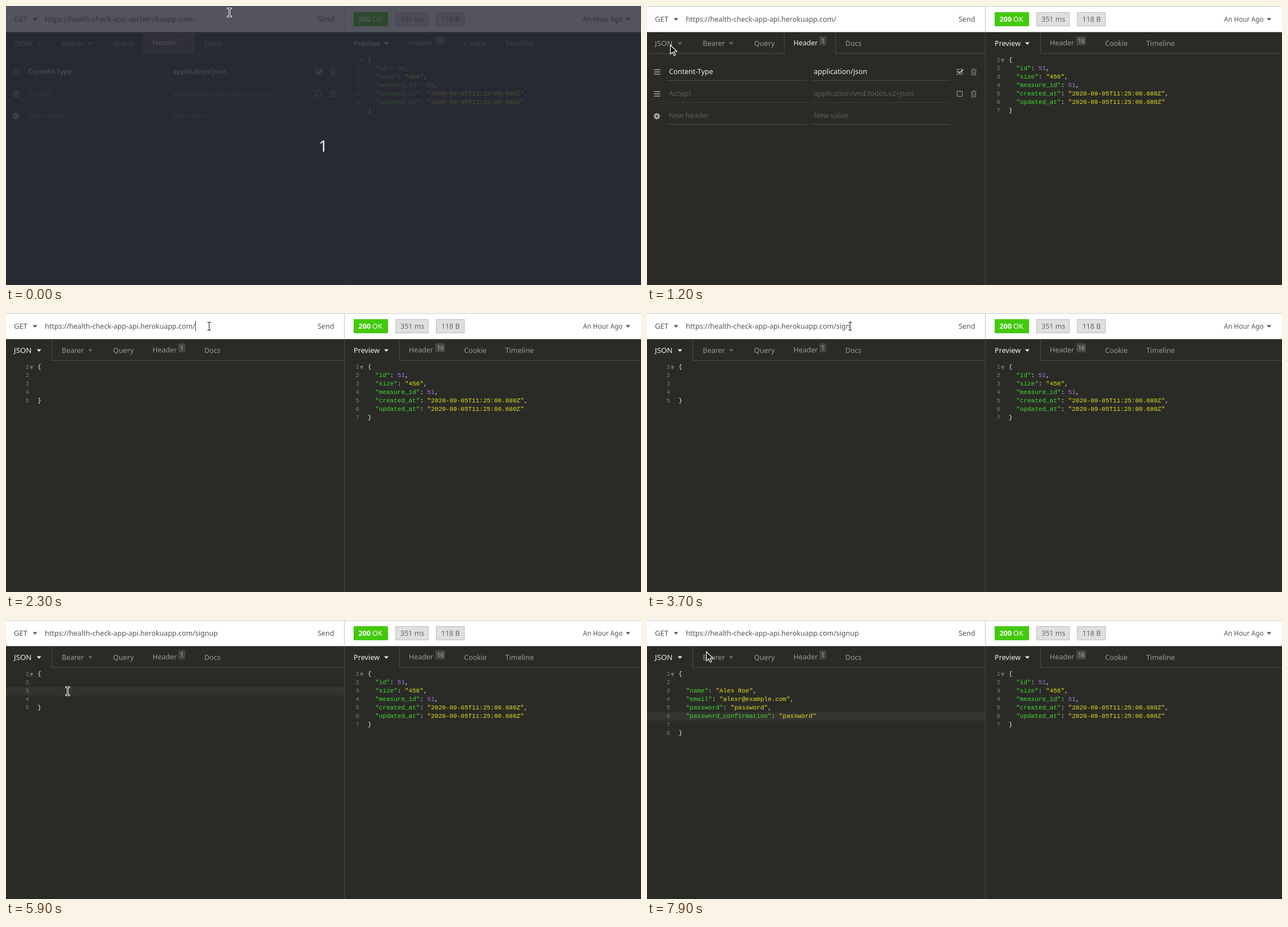
Animation, 1127 px wide and 496 px high, one loop 8000 ms. Source, as an HTML page with a canvas:

```html
<!DOCTYPE html>
<html lang="en">
<head>
<meta charset="utf-8">
<style>
  html, body { margin: 0; width: 100%; height: 100%; overflow: hidden; background: #2a2b26; }
  canvas { display: block; }
</style>
</head>
<body>
<canvas id="stage" width="1127" height="496"></canvas>
<script>
const ctx = document.getElementById('stage').getContext('2d');
const LOOP = 8000;
const SANS = '"Noto Sans", "Open Sans", sans-serif';
const MONO = '"Liberation Mono", monospace';
const BG = '#2a2b26', LINE = '#4a4b47', RAISED = '#464743', ACTIVE_ROW = '#33342f';
const BRIGHT = '#eeeeec', MUTED = '#989895', FAINT = '#5c5d59';
const KEY = '#46d936', STRING = '#e2de26', NUMBER = '#a774ea';
const URL_BASE = 'https://health-check-app-api.herokuapp.com/';

// Pointer stops: time, x, y, shape
const POINTER = [
  [0, 396, 11, 'beam'], [600, 370, 16, 'beam'], [700, 292, 32, 'beam'],
  [800, 196, 47, 'arrow'], [900, 128, 52, 'arrow'], [1100, 68, 62, 'arrow'],
  [1200, 41, 69, 'arrow'], [1600, 80, 57, 'beam'], [1800, 188, 36, 'beam'],
  [1900, 205, 37, 'beam'], [2100, 268, 31, 'beam'], [2200, 338, 24, 'beam'],
  [2300, 360, 23, 'beam'], [4800, 290, 70, 'beam'], [4900, 155, 130, 'beam'],
  [5100, 109, 126, 'beam'], [6700, 101, 134, 'beam'], [6800, 138, 158, 'beam'],
  [6900, 191, 163, 'beam'], [7100, 262, 152, 'beam'], [7200, 338, 134, 'beam'],
  [7400, 409, 88, 'beam'], [7600, 359, 88, 'beam'], [7800, 230, 74, 'arrow'],
  [7900, 105, 56, 'arrow']
];
const KEY_TIMES = [3200, 3300, 3500, 3700, 4200, 4300];

const EMPTY_BODY = ['{', '', '', '', '}'];
const FILLED_BODY = ['{', '', '  "name": "Alex Roe",', '  "email": "alexr@example.com",',
  '  "password": "password",', '  "password_confirmation": "password"', '', '}'];
const RESPONSE = ['{', '  "id": 51,', '  "size": "456",', '  "measure_id": 51,',
  '  "created_at": "2020-09-05T11:25:00.680Z",',
  '  "updated_at": "2020-09-05T11:25:00.680Z"', '}'];

const within = (t, from, to) => t >= from && t < to;

function rect(x, y, w, h, color) {
  ctx.fillStyle = color;
  ctx.fillRect(x, y, w, h);
}

function text(str, x, y, color, size = 12.5, weight = '') {
  ctx.font = `${weight} ${size}px ${SANS}`;
  ctx.fillStyle = color;
  ctx.fillText(str, x, y);
}

function poly(points, color) {
  ctx.beginPath();
  points.forEach(([x, y]) => ctx.lineTo(x, y));
  ctx.closePath();
  ctx.fillStyle = color;
  ctx.fill();
}

const dropMark = (x, y, color, w = 8, h = 4.5) =>
  poly([[x, y], [x + w, y], [x + w / 2, y + h]], color);

function outline(x, y, w, h, color) {
  ctx.strokeStyle = color;
  ctx.lineWidth = 1;
  ctx.strokeRect(x + .5, y + .5, w - 1, h - 1);
}

function chip(x, w, label, textX) {
  rect(x, 11, w, 25, '#dfdfdf');
  outline(x, 11, w, 25, '#bdbdbd');
  text(label, textX, 28, '#666');
}

function badge(x, w, label) {
  ctx.beginPath();
  ctx.roundRect(x, 54, w, 16, 2);
  ctx.fillStyle = RAISED;
  ctx.fill();
  text(label, x + 3, 66, '#b5b5b2', 10.5);
}

function topBar(t) {
  rect(0, 0, 1127, 46, '#fff');
  rect(0, 0, 1127, 1, '#c8c8c8');
  rect(0, 46, 1127, 1, '#81827f');
  rect(600, 0, 1, 46, '#c4c4c4');
  text('GET', 14, 28, '#555', 13);
  dropMark(47.5, 21.5, '#555');

  const typed = 'signup'.slice(0, KEY_TIMES.filter(k => t >= k).length);
  const url = URL_BASE + typed;
  text(url, 69, 28, '#555');
  if (within(t, 2300, 3000) || within(t, 3200, 4800))
    rect(Math.round(69 + ctx.measureText(url).width), 14, 1, 18, '#333');

  text('Send', 553, 28, '#555');
  rect(617, 11, 61, 25, '#43c90c');
  text('200', 625.5, 28, '#fff', 12.7, 'bold');
  text('OK', 650, 28, '#fff', 12.7);
  chip(691, 59, '351 ms', 700);
  chip(763, 51, '118 B', 772.5);
  text('An Hour Ago', 1024, 28, '#555', 11.7);
  dropMark(1100, 21.5, '#555');
}

function tabs(t) {
  const json = t >= 1300;
  const [x, right] = json ? [0, 82] : [243, 335];
  rect(0, 84, 600, 1, LINE);
  rect(699, 84, 428, 1, LINE);
  const pressed = t < 1200 || within(t, 1300, 2300);
  rect(x, 47, right - x, 38, pressed ? RAISED : BG);
  if (!json) rect(x, 47, 1, 38, LINE);
  rect(right - 1, 47, 1, 38, LINE);
  rect(698, 47, 1, 38, LINE);
  rect(600, 47, 1, 449, LINE);

  text('JSON', 14, 71, json ? BRIGHT : MUTED, 13.3);
  dropMark(54.5, 64.5, json ? BRIGHT : '#6b6c68');
  text('Bearer', 99, 71, MUTED);
  dropMark(145.5, 64.5, '#6b6c68');
  text('Query', 190, 71, MUTED, 12.7);
  text('Header', 260, 70, json ? MUTED : BRIGHT);
  badge(306, 12, '1');
  text('Docs', 352, 71, MUTED);

  text('Preview', 617, 71, BRIGHT, 12.7);
  dropMark(671, 64.5, BRIGHT);
  text('Header', 715, 70, MUTED);
  badge(762, 17, '16');
  text('Cookie', 813, 71, MUTED);
  text('Timeline', 886, 71, MUTED, 12.7);
}

function trash(y) {
  const c = '#8d8e8a';
  rect(575, y - 4, 10, 1, c);
  rect(578, y - 6, 4, 1, c);
  outline(576, y - 4, 8, 10, c);
  rect(578, y - 1, 1, 5, c);
  rect(581, y - 1, 1, 5, c);
}

function gear(x, y) {
  ctx.strokeStyle = ctx.fillStyle = '#a6a7a3';
  ctx.lineWidth = 3;
  ctx.beginPath();
  ctx.arc(x, y, 3.2, 0, 7);
  ctx.stroke();
  for (let i = 0; i < 8; i++) {
    ctx.save();
    ctx.translate(x, y);
    ctx.rotate(i * Math.PI / 4);
    ctx.fillRect(-1.2, -5.7, 2.4, 2);
    ctx.restore();
  }
}

function headerRow(y, name, value, color, dashed) {
  text(name, 39, y + 4, color);
  text(value, 296, y + 4, color, 12.6);
  ctx.strokeStyle = LINE;
  ctx.lineWidth = 1;
  ctx.setLineDash(dashed ? [3, 2] : []);
  ctx.beginPath();
  for (const [from, to] of [[36, 283], [293, 538]]) {
    ctx.moveTo(from, y + 15.5);
    ctx.lineTo(to, y + 15.5);
  }
  ctx.stroke();
  ctx.setLineDash([]);
}

function headerPane() {
  headerRow(117, 'Content-Type', 'application/json', BRIGHT);
  headerRow(156, 'Accept', 'application/vnd.todos.v2+json', FAINT, true);
  headerRow(195, 'New header', 'New value', FAINT);
  for (const y of [117, 156]) {
    for (const dy of [-4, 0, 4]) rect(12.5, y + dy - .5, 11, 1.5, '#a6a7a3');
    outline(550, y - 5, 10, 10, '#a0a19d');
    trash(y);
  }
  ctx.strokeStyle = '#d0d0cd';
  ctx.lineWidth = 1.7;
  ctx.beginPath();
  ctx.moveTo(552, 116);
  ctx.lineTo(555, 119);
  ctx.lineTo(561, 113);
  ctx.stroke();
  gear(17.5, 196);
}

function editor(lines, x) {
  ctx.font = `11px ${MONO}`;
  const charWidth = ctx.measureText('0').width;
  lines.forEach((line, i) => {
    const y = 99 + 15 * i;
    ctx.fillStyle = '#7b7c78';
    ctx.fillText(i + 1, x - 15 - charWidth, y);
    for (const m of line.matchAll(/"[^"]*"|\d+|[{}:,]/g)) {
      const isKey = line[m.index + m[0].length] === ':';
      ctx.fillStyle = m[0][0] === '"' ? (isKey ? KEY : STRING) : /\d/.test(m[0]) ? NUMBER : BRIGHT;
      ctx.fillText(m[0], x + m.index * charWidth, y);
    }
  });
  dropMark(x - 14, 94, '#6b6c68', 6.5, 7);
}

function bodyPane(t) {
  const filled = t >= 6200;
  if (t >= 5100) rect(0, filled ? 164 : 119, 600, 15, ACTIVE_ROW);
  editor(filled ? FILLED_BODY : EMPTY_BODY, 56);
  if (within(t, 5300, 5900)) rect(56, 119, 1, 15, BRIGHT);
  if (within(t, 6200, 6700) || within(t, 7400, 7900)) rect(300, 164, 1, 15, BRIGHT);
}

function pointer(t) {
  const [, x, y, shape] = POINTER.findLast(p => t >= p[0]);
  ctx.save();
  ctx.translate(x + .5, y + .5);
  if (shape === 'arrow') {
    const path = new Path2D('M0 0V16L4 12.5 6.5 18.5 9 17.5 6.5 11.5H11.5Z');
    ctx.fillStyle = '#111';
    ctx.fill(path);
    ctx.strokeStyle = '#fff';
    ctx.lineWidth = 1.2;
    ctx.stroke(path);
  } else {
    const path = new Path2D('M-2.5 -7H2.5M0 -7V7M-2.5 7H2.5');
    ctx.lineCap = 'square';
    for (const [width, color] of [[3, '#fff'], [1, '#111']]) {
      ctx.lineWidth = width;
      ctx.strokeStyle = color;
      ctx.stroke(path);
    }
  }
  ctx.restore();
}

function draw(t) {
  rect(0, 0, 1127, 496, BG);
  topBar(t);
  tabs(t);
  if (t < 1300) headerPane();
  else bodyPane(t);
  editor(RESPONSE, 642);
  if (t < 200) {
    rect(0, 0, 1127, 496, 'rgba(40, 42, 54, .8)');
    text('1', 555, 259, '#f4f4f4', 28);
  }
  pointer(t);
}

const start = performance.now();
function frame() {
  draw((performance.now() - start) % LOOP);
  requestAnimationFrame(frame);
}
frame();
</script>
</body>
</html>
```
